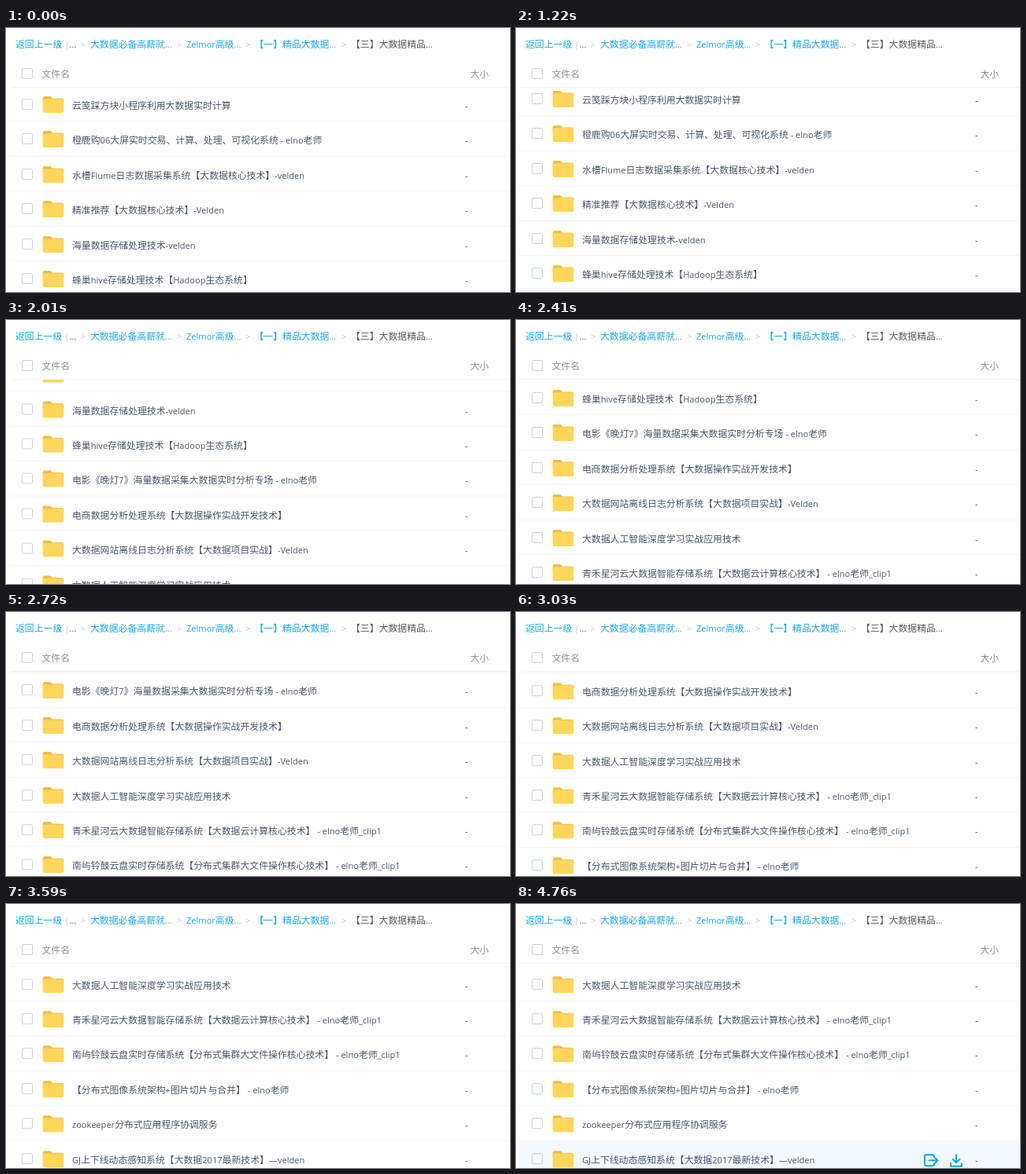
Recreate the animation shown at these times as an HTML page. Size 640 by 336 pixels, loop 4990 ms.

```html
<!DOCTYPE html>
<html lang="zh-CN">
<head>
<meta charset="utf-8">
<style>
  html, body { margin: 0; width: 100%; height: 100%; overflow: hidden; background: #fff; }
  body { position: relative; font: 11.87px/44px "Noto Sans CJK SC", "Noto Sans CJK", sans-serif;
         color: #4d586f; white-space: nowrap; text-spacing-trim: space-all; }
  body * { position: absolute; }
  i { position: static !important; font: normal .935em/0 "Open Sans", "Noto Sans", sans-serif; }
  .crumb { top: -2px; color: #16a9f6; }
  .crumb.sep { color: #b9cbe2; }
  .crumb.here { color: #5c5c5c; }
  .crumb.more { color: #4a4a4a; font-weight: 700; }
  .head { top: 36px; color: #909090; }
  .rule { left: 6px; top: 75px; width: 634px; height: 1px; background: #f0f6fa; }
  .box { left: 19.5px; top: 15px; width: 12px; height: 12px; border: 1.2px solid #c8d3e4; border-radius: 2px; }
  #view { left: 0; top: 75px; width: 640px; height: 261px; overflow: hidden; }
  .row { left: 4px; width: 636px; height: 43.4px; border-bottom: 1px solid #f2f7fb; }
  .row > * { margin-left: -4px; }
  .row .name { left: 84px; top: 1px; }
  .row .size { left: 583px; top: 1px; }
  .row .box { top: 15px; }
  .row svg { left: 0; top: 0; overflow: visible; }
  .row .tools { visibility: hidden; fill: none; stroke: #09a5f5; stroke-width: 2;
                stroke-linecap: round; stroke-linejoin: round; }
  .hover { background: #f3f9ff; border-color: #e6f2fc; }
  .hover .tools { visibility: visible; }
</style>
</head>
<body>
<div id="view"><div id="list"></div></div>
<div class="rule"></div>
<div class="box" style="top:51px"></div>
<div class="head" style="left:45.5px">文件名</div>
<div class="head" style="left:589.5px">大小</div>
<script>
const LOOP = 4990, PITCH = 44.4;

const names = [
  '云笺踩方块小程序利用大数据实时计算',
  '橙鹿购06大屏实时交易、计算、处理、可视化系统 - elno老师',
  '水槽Flume日志数据采集系统【大数据核心技术】-velden',
  '精准推荐【大数据核心技术】-Velden',
  '海量数据存储处理技术-velden',
  '蜂巢hive存储处理技术【Hadoop生态系统】',
  '电影《晚灯7》海量数据采集大数据实时分析专场 - elno老师',
  '电商数据分析处理系统【大数据操作实战开发技术】',
  '大数据网站离线日志分析系统【大数据项目实战】-Velden',
  '大数据人工智能深度学习实战应用技术',
  '青禾星河云大数据智能存储系统【大数据云计算核心技术】 - elno老师_clip1',
  '南屿铃鼓云盘实时存储系统【分布式集群大文件操作核心技术】 - elno老师_clip1',
  '【分布式图像系统架构+图片切片与合并】 - elno老师',
  'zookeeper分布式应用程序协调服务',
  'GJ上下线动态感知系统【大数据2017最新技术】—velden'
];

const crumbs = [
  [12, '返回上一级'], [74, '|', 'sep'], [80.5, '...', 'more'], [95, '>', 'sep'],
  [107, '大数据必备高薪就...'], [217, '>', 'sep'], [229, 'Zelmor高级...'], [304, '>', 'sep'],
  [315.5, '【一】精品大数据...'], [426, '>', 'sep'], [438, '【三】大数据精品...', 'here']
];

// [time, scroll step] and [scroll step, distance]
const stepKeys = [[1220, 1], [1710, 7], [1780, 8], [2010, 11], [2410, 16], [2480, 17],
  [2800, 21], [2880, 22], [3030, 24], [3360, 28], [3430, 29], [3590, 31]];
const scrollKeys = [[0, 0], [1, 7], [11, 161.5], [16, 220], [24, 307.8], [31, 394.8]];

// [from, to, row under the pointer]
const hovers = [[120, 200, 3], [200, 360, 2], [360, 830, 1], [4290, 4680, 14], [4760, LOOP, 14]];

const mixed = s => s.replace(/[ -~—]+/g, m => `<i>${m.replace('>', '&gt;')}</i>`);

document.body.insertAdjacentHTML('beforeend', crumbs.map(([x, text, kind = '']) =>
  `<div class="crumb ${kind}" style="left:${x}px">${mixed(text)}</div>`).join(''));

const list = document.getElementById('list');
list.innerHTML = names.map((name, i) => `
  <div class="row" style="top:${i * PITCH}px"><div class="box"></div>
  <svg width="80" height="44">
    <path fill="#f2bd45" d="M46.7 20V14q0-2 2-2h7.8l2.5 2.5h12.3q2 0 2 2V20z"/>
    <rect fill="#ffd65b" x="46.7" y="15.3" width="26.6" height="17.7" rx="1.8"/>
  </svg>
  <div class="name">${mixed(name)}</div>
  <svg class="tools" width="640" height="44">
    <path d="M531 20v-1q0-2-2-2h-8q-2 0-2 2v10q0 2 2 2h8q2 0 2-2v-1M525 24h10.5m-3-3l3 3-3 3"/>
    <path d="M559 17v10m-4.5-4.5l4.5 4.5 4.5-4.5M552 28v3.5h14v-3.5"/>
  </svg>
  <div class="size"><i>-</i></div></div>`).join('');
const rows = [...list.children];

function along(keys, x) {
  if (x < keys[0][0]) return 0;
  const k = keys.findIndex(key => key[0] > x);
  if (k < 0) return keys[keys.length - 1][1];
  const [x0, y0] = keys[k - 1], [x1, y1] = keys[k];
  return y0 + (y1 - y0) * (x - x0) / (x1 - x0);
}

function draw(now) {
  const t = now % LOOP;
  const step = Math.floor(along(stepKeys, t) + 1e-6);
  list.style.transform = `translateY(${-along(scrollKeys, step)}px)`;
  const hit = hovers.find(([from, to]) => t >= from && t < to);
  rows.forEach((row, i) => row.classList.toggle('hover', !!hit && hit[2] === i));
}

const start = performance.now();
function tick() {
  draw(performance.now() - start);
  requestAnimationFrame(tick);
}
tick();
</script>
</body>
</html>
```
